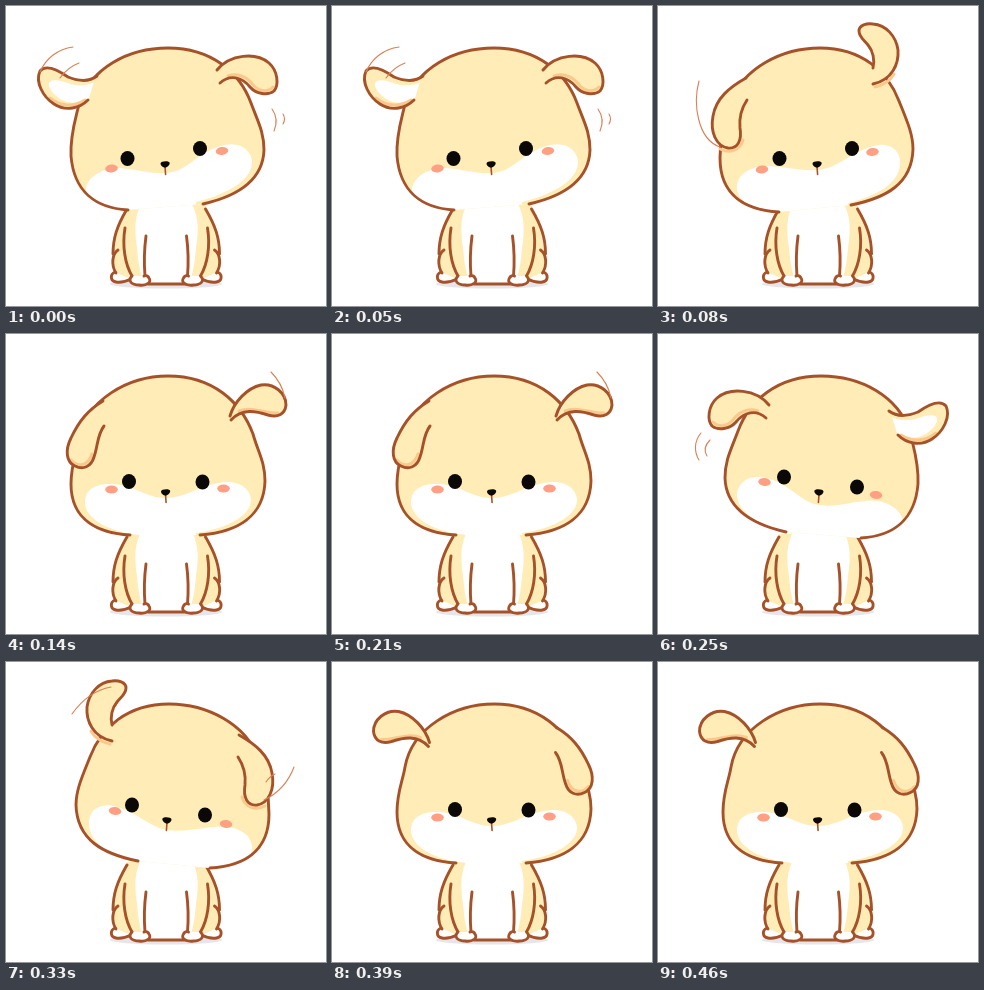
These frames come from a looping animation (320 by 300 pixels, 0.5 s). An HTML page without scripts:

```html
<!DOCTYPE html>
<html lang="en">
<head>
<meta charset="utf-8">
<title>Puppy flapping its ears</title>
<style>
  html, body { margin: 0; width: 100%; height: 100%; overflow: hidden; background: #fff; }
  svg { display: block; width: 100%; height: 100%; }

  .line, .ear { stroke: #a5522a; stroke-width: 2.9; stroke-linecap: round; stroke-linejoin: round; }
  .line { fill: none; }
  .fur, .ear { fill: #ffecb6; }
  .white { fill: #fff; }
  .shade { fill: none; stroke: #fbc88c; stroke-width: 3; stroke-linecap: round; }
  .whoosh { fill: none; stroke: #d98055; stroke-width: 1.1; stroke-linecap: round; }
  .ink { fill: #0b0808; }
  .blush { fill: #ff9f83; }
  .muzzle { fill: #fff; transform: translateY(var(--drop, 0px)); }

  /* Each pose is shown for a slice of the 500 ms loop, then cut away. */
  .pose { visibility: hidden; animation: 500ms step-end infinite; }
  .long { animation-name: long; }
  .mid { animation-name: mid; }
  .short { animation-name: short; }
  @keyframes mid { 0% { visibility: visible; } 16%, 100% { visibility: hidden; } }
  @keyframes short { 0% { visibility: visible; } 12%, 100% { visibility: hidden; } }
  @keyframes long { 0% { visibility: visible; } 22%, 100% { visibility: hidden; } }
</style>
</head>
<body>
<svg viewBox="0 0 320 300">
  <defs>
    <g id="eye"><ellipse class="ink" rx="7" ry="7.500"/></g>
    <g id="cheek"><ellipse class="blush" rx="6.300" ry="4"/></g>
    <g id="nose">
      <path class="line" style="stroke-width:1.6" d="M0 2L.6 10"/>
      <path class="ink" d="M-4.500 -1C-4.500 -3.500 4.500 -4 4.700 -1.500C4.700 1 1.700 3.200 0 3.200C-1.800 3.200 -4.500 1 -4.500 -1Z"/>
    </g>

    <!-- heads: tilted, tilted and lowered, upright -->
    <path id="skull-tilt" d="M122 204C90 202 68 186 65 150C64 128 70 112 73 98C85 62 122 42 162 42C206 42 234 67 245 97C252 116 258 126 258 144C257 174 232 190 197 198"/>
    <path id="skull-low" d="M121 206C88 204 62 190 62 152C62 128 68 112 73 96C85 62 124 42 162 42C204 42 230 66 241 95C249 115 255 128 255 143C254 178 228 192 193 199"/>
    <path id="skull-up" d="M124 201C92 199 65 186 65 150C65 130 71 118 73 105C80 66 122 42 162 42C207 42 235 68 247 100C252 118 259 128 259 147C258 182 232 198 194 201"/>
    <clipPath id="in-tilt"><use href="#skull-tilt"/></clipPath>
    <clipPath id="in-low"><use href="#skull-low"/></clipPath>
    <clipPath id="in-up"><use href="#skull-up"/></clipPath>

    <g id="head-tilt">
      <use class="fur" href="#skull-tilt"/>
      <g clip-path="url(#in-tilt)">
        <path class="muzzle" d="M80 182C83 169 98 162 112 162C132 163 142 168 160 167C182 166 190 146 218 139C236 135 246 146 246 156C246 174 222 188 190 196V208H134C110 204 79 200 80 182Z"/>
      </g>
      <use class="line" href="#skull-tilt"/>
    </g>
    <g id="head-low">
      <use class="fur" href="#skull-low"/>
      <g clip-path="url(#in-low)">
        <path class="muzzle" d="M79 180C80 167 94 160 110 160C130 161 142 165 160 164C182 162 194 144 220 139C236 137 243 148 242 158C241 178 218 190 190 197V208H134C105 206 78 200 79 180Z"/>
      </g>
      <use class="line" href="#skull-low"/>
    </g>
    <g id="head-up">
      <use class="fur" href="#skull-up"/>
      <g clip-path="url(#in-up)">
        <path class="muzzle" d="M79 168C79 154 92 149 108 150C130 152 140 164 160 164C180 164 195 150 220 148C236 147 245 157 245 166C245 180 225 194 190 199V206H134V201C105 198 79 186 79 168Z"/>
      </g>
      <use class="line" href="#skull-up"/>
    </g>

    <!-- ear pairs -->
    <g id="ears-out">
      <path class="fur" d="M91 70C82 77 72 75 62 71C52 64 40 58 34 65C29 76 37 91 48 98C60 106 74 102 82 94Z"/>
      <path class="white" d="M43 77C46 72 56 75 64 78C72 80 82 80 88 76L83 92C76 98 62 98 54 93C47 88 42 82 43 77Z"/>
      <path class="shade" d="M44 92C55 101 68 101 79 94"/>
      <path class="line" d="M91 70C82 77 72 75 62 71C52 64 40 58 34 65C29 76 37 91 48 98C60 106 74 102 82 94"/>
      <path class="fur" d="M211 64C224 48 250 46 263 57C272 65 273 79 268 85C262 90 250 88 244 81C236 71 224 68 214 77Z"/>
      <path class="shade" d="M222 70C234 66 243 73 248 80C254 86 262 86 267 81"/>
      <path class="line" d="M211 64C224 48 250 46 263 57C272 65 273 79 268 85C262 90 250 88 244 81C236 71 224 68 214 77"/>
    </g>
    <g id="ears-high">
      <path class="shade" d="M62 143C72 148 82 144 85 134M217 81C226 79 232 75 236 68"/>
      <path class="ear" d="M89 94C83 103 81 112 82 122C84 134 80 143 70 142C58 140 52 126 55 110C58 92 72 81 88 72"/>
      <path class="ear" d="M215 62C217 54 215 45 210 39C206 34 201 31 201 25C201 19 209 17 215 18C228 19 238 30 240 44C241 58 234 74 215 78"/>
    </g>
    <g id="ears-mid">
      <path class="fur" d="M98 92C91 101 92 112 88 123C85 133 77 136 69 132C60 128 59 116 65 104C73 87 82 76 97 67Z"/>
      <path class="shade" d="M65 126C72 134 82 132 86 120"/>
      <path class="line" d="M98 92C91 101 92 112 88 123C85 133 77 136 69 132C60 128 59 116 65 104C73 87 82 76 97 67"/>
      <path class="fur" d="M224 82C228 68 241 54 255 51C268 49 280 59 280 71C279 80 272 84 262 81C250 77 236 74 225 86Z"/>
      <path class="shade" d="M233 77C246 72 262 80 272 79"/>
      <path class="line" d="M224 82C228 68 241 54 255 51C268 49 280 59 280 71C279 80 272 84 262 81C250 77 236 74 225 86"/>
    </g>

    <!-- one side of the seated body -->
    <g id="side">
      <path class="line" style="fill:#fff" d="M109 266C104 268 104 275 110 276C116 277 121 275 125 273"/>
      <path class="line" d="M121 203C111 220 107 232 107 248M119 222C116 240 119 258 126 270M140 230C138 245 138 258 139 270"/>
      <path class="line" d="M112 244C106 248 105 259 110 267"/>
      <path class="line" style="fill:#fff" d="M126 270C121 275 126 279 133 279C141 280 146 276 143 272C142 270 140 269 138 270"/>
    </g>
  </defs>

  <rect width="320" height="300" fill="#fff"/>
  <ellipse cx="160" cy="278" rx="56" ry="4.500" fill="#e6e5e9"/>
  <path class="fur" d="M121 200C110 218 107 240 107 266L124 276H197L213 266C213 240 209 218 199 198Z"/>
  <path class="white" d="M136 196C127 212 129 228 131 242C132 256 134 266 137 274L142 278H179L184 274C187 266 189 256 190 242C192 228 194 212 185 196Z"/>
  <path class="line" d="M142 278H180"/>
  <use href="#side"/>
  <use href="#side" transform="translate(320.500) scale(-1 1)"/>

  <g class="pose mid" style="animation-delay:0ms">
    <use href="#head-tilt"/>
    <use href="#ears-out"/>
    <use href="#cheek" transform="translate(105.500 162.500) rotate(-6)"/>
    <use href="#cheek" transform="translate(216 145) rotate(-6)"/>
    <use href="#eye" x="121.500" y="152.500"/>
    <use href="#eye" x="194" y="142.500"/>
    <use href="#nose" x="159" y="158.500"/>
    <path class="whoosh" d="M34 66C40 52 52 43 67 41M54 72C59 65 65 60 73 57M266 103C271 110 271 118 268 125M277 108Q280 113 277 118"/>
  </g>

  <g class="pose short" style="animation-delay:-420ms">
    <use href="#head-low"/>
    <use href="#ears-high"/>
    <use href="#cheek" transform="translate(104 163.500) rotate(-6)"/>
    <use href="#cheek" transform="translate(214.500 146) rotate(-6)"/>
    <use href="#eye" x="121.500" y="152.500"/>
    <use href="#eye" x="194" y="142.500"/>
    <use href="#nose" x="159" y="158.500"/>
    <path class="whoosh" d="M41 75C35 97 39 133 62 141"/>
  </g>

  <g class="pose long" style="animation-delay:-360ms">
    <use href="#head-up"/>
    <use href="#ears-mid"/>
    <use href="#cheek" x="105.500" y="155.500"/>
    <use href="#cheek" x="217.500" y="154.500"/>
    <use href="#eye" x="123" y="147.500"/>
    <use href="#eye" x="196.500" y="148"/>
    <use href="#nose" x="159.500" y="158.500"/>
    <path class="whoosh" d="M265 38C272 45 277 54 279 64"/>
  </g>

  <g class="pose mid" style="animation-delay:-250ms; --drop:4.500px">
    <use href="#head-tilt" transform="translate(325) scale(-1 1)"/>
    <use href="#ears-out" transform="translate(322 7) scale(-1 1)"/>
    <use href="#cheek" transform="translate(106.500 148) rotate(6)"/>
    <use href="#cheek" transform="translate(218 161) rotate(6)"/>
    <use href="#eye" x="126" y="143"/>
    <use href="#eye" x="199" y="153"/>
    <use href="#nose" transform="translate(161 158.500) scale(-1 1)"/>
    <path class="whoosh" d="M43 99C36 107 36 118 41 126M52 106Q44 114 49 122"/>
  </g>

  <g class="pose short" style="animation-delay:-170ms; --drop:4.500px">
    <use href="#head-low" transform="translate(325) scale(-1 1)"/>
    <use href="#ears-high" transform="translate(321 1) scale(-1 1)"/>
    <use href="#cheek" transform="translate(109 149) rotate(6)"/>
    <use href="#cheek" transform="translate(220 162) rotate(6)"/>
    <use href="#eye" x="126" y="143"/>
    <use href="#eye" x="199" y="153"/>
    <use href="#nose" transform="translate(161 158.500) scale(-1 1)"/>
    <path class="whoosh" d="M66 52C76 38 88 28 105 25M288 105C282 121 273 131 258 138M260 120Q264 114 269 112"/>
  </g>

  <g class="pose long" style="animation-delay:-110ms">
    <use href="#head-up"/>
    <use href="#ears-mid" transform="translate(321.500 -1.500) scale(-1 1)"/>
    <use href="#cheek" x="105.500" y="155.500"/>
    <use href="#cheek" x="217.500" y="154.500"/>
    <use href="#eye" x="123" y="147.500"/>
    <use href="#eye" x="196.500" y="148"/>
    <use href="#nose" x="159.500" y="158.500"/>
  </g>
</svg>
</body>
</html>
```
